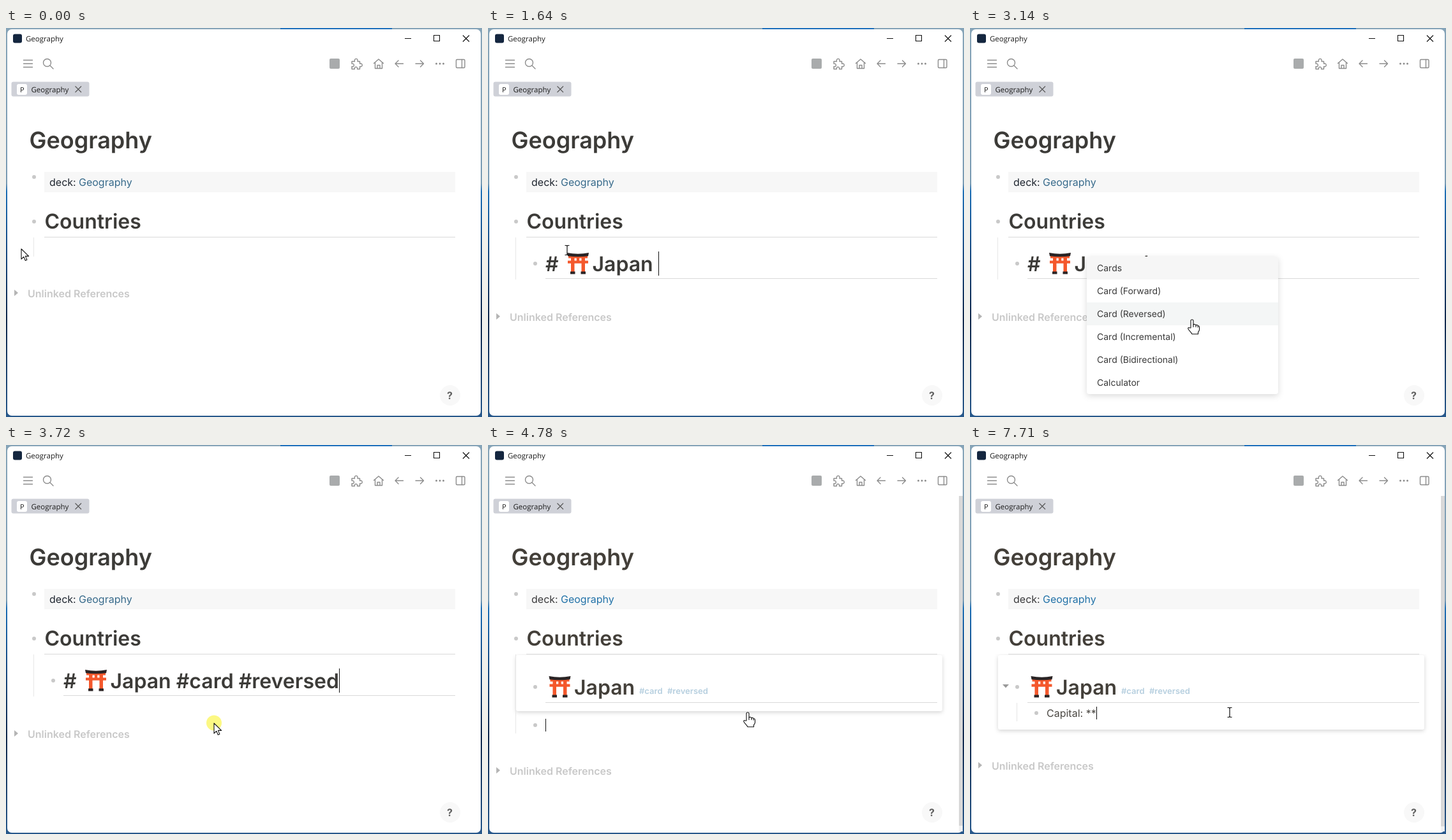
Recreate the animation shown at these times as an HTML page. Size 746 px wide and 611 px high, loop 8 s.

```html
<!DOCTYPE html>
<html lang="en">
<head>
<meta charset="utf-8">
<title>Geography</title>
<style>
  html, body { margin: 0; width: 100%; height: 100%; overflow: hidden; background: #fff; }
  svg { display: block; width: 746px; height: 611px; }
  text { white-space: pre; font-family: Inter, sans-serif; font-optical-sizing: none; text-rendering: geometricPrecision; }
  .ui { font: 11.5px "Open Sans", sans-serif; fill: #1c1c1c; }
  .title { font-size: 36px; font-weight: 600; }
  .head { font-size: 32px; font-weight: 600; }
  .body { font-size: 16px; }
  .tag { font-size: 13px; font-weight: 600; fill: #b6cfdf; }
  .item { font-size: 14px; fill: #3a3a3a; }
  .refs { font-size: 16px; font-weight: 600; fill: #c8c8c8; }
  .icon { fill: none; stroke: #8c8c8c; stroke-width: 1.4; stroke-linecap: round; stroke-linejoin: round; }
  .win { fill: none; stroke: #111; stroke-width: 1.1; }
  .cursor { fill: #fff; stroke: #111; stroke-width: 1.1; stroke-linejoin: round; }
  .card { filter: drop-shadow(0 2px 3px rgba(0, 0, 0, .17)); }
  .menu { filter: drop-shadow(0 3px 5px rgba(0, 0, 0, .14)); }
</style>
</head>
<body>
<svg viewBox="0 0 746 611" xmlns="http://www.w3.org/2000/svg">
  <defs>
    <linearGradient id="desk" x2="0" y2="1">
      <stop offset="0" stop-color="#86a4b8"/>
      <stop offset=".4" stop-color="#7b9cb4"/>
      <stop offset=".42" stop-color="#1f70b6"/>
      <stop offset=".56" stop-color="#1b4f88"/>
      <stop offset=".75" stop-color="#12294c"/>
      <stop offset="1" stop-color="#28598c"/>
    </linearGradient>
    <clipPath id="menuClip"><rect x="183" y="359" width="300" height="221" rx="4"/></clipPath>
  </defs>
  <rect width="746" height="611" fill="url(#desk)"/>
  <rect x="430" width="175" height="2" fill="#2272bd"/>
  <rect x="2" y="2" width="742" height="607" rx="7" fill="#fff"/>

  <rect x="11" y="9.500" width="14" height="14" rx="3" fill="#14263f"/>
  <text class="ui" x="31" y="21">Geography</text>
  <path class="win" d="M625 16.500h10M670.500 11.500h9v9h-9zM716 11.500l10 10m0-10l-10 10"/>

  <g class="icon">
    <path d="M27.500 50.500h14m-14 5.500h14m-14 5.500h14"/>
    <circle cx="64.500" cy="54.500" r="6"/>
    <path d="M69 59l5 5"/>
    <path d="M543 52.500h3.500c-1.500-5.500 6-5.500 4.500 0h3.500v3.500c5-1.500 5 6 0 4.500v4h-4c1-4.500-5-4.500-4 0H542v-4c4.500 1.500 4.500-5.500 0-4.500v-3.500z"/>
    <path d="M576.500 55.500l7.500-6.500 7.500 6.500M578.500 54v9.500h11V54M582 63.500v-5h4v5"/>
    <path d="M622.500 56h-12.500l5-5m-5 5l5 5M642 56h12.500l-5-5m5 5l-5 5"/>
    <rect x="705.500" y="49.500" width="13.500" height="13" rx="1.500"/>
    <path d="M714.500 49.500v13"/>
  </g>
  <g fill="#8c8c8c"><circle cx="674.500" cy="56" r="1.500"/><circle cx="680" cy="56" r="1.500"/><circle cx="685.500" cy="56" r="1.500"/></g>
  <rect x="507" y="48" width="16" height="16" rx="2" fill="#a9abac"/>

  <rect x="8.500" y="84.500" width="122" height="23" rx="3" fill="#cfd1d8"/>
  <rect x="17" y="88" width="16" height="17" rx="3" fill="#fff"/>
  <text class="ui" x="22" y="101" style="font-size:11px">P</text>
  <text class="ui" x="39.500" y="101">Geography</text>
  <path class="win" d="M108.500 91.500l9.500 9.500m0-9.500l-9.500 9.500" style="stroke:#555"/>

  <rect x="60" y="226" width="644" height="32" fill="#f7f7f7"/>
  <g id="page"></g>
  <circle cx="696" cy="577" r="16" fill="#f8f8f8"/>
  <text x="691" y="583" style="font-size:16px;font-weight:700" fill="#606060">?</text>
  <g id="mouse"></g>
  <text id="ruler" visibility="hidden"></text>
</svg>
<script>
const LOOP = 8000;
const page = document.getElementById('page');
const mouse = document.getElementById('mouse');
const ruler = document.getElementById('ruler');

const CLICK = 400, PASTE = 640, SLASH = 2050, PICK = 3660, ENTER = 4780, TAB = 5060;
const MENUS = {
  all: ['Page reference', 'Page embed', 'Block reference', 'Block embed', 'Link', 'Image link'],
  c: ['C', 'Cards', 'Cloze', 'CANCELED', 'Scheduled', 'Block embed'],
  car: ['Cards', 'Card (Forward)', 'Card (Reversed)', 'Card (Incremental)', 'Card (Bidirectional)', 'Calculator']
};
// time, x, y of the pointer's hot spot
const TRACK = [
  [50, 24, 347], [CLICK, 124, 349], [2550, 124, 349], [2950, 352, 470], [3139, 352, 470],
  [3140, 348, 458], [3190, 348, 458], [3460, 326, 437], [3760, 326, 437], [4090, 407, 420]
];
const SHAPES = {
  arrow: '<path class="cursor" d="M0 0v16l3.800-3.600 2.500 5.800 2.600-1.100-2.500-5.700h5.200z"/>',
  beam: '<path d="M-3.500-7.500h2.500l1 1 1-1h2.500M0-6.500v13M-3.500 7.500h2.500l1-1 1 1h2.500" fill="none" stroke="#111" stroke-width="1.200"/>',
  hand: '<path class="cursor" d="M-2 13V2a2 2 0 0 1 4 0v6c1-1 3.500-.7 4 .8c1.200-.8 2.800-.3 3.200 1c1.300-.4 2.300.4 2.300 2v4c0 2-1.500 3-2 4v3H0c-1-2.500-4.500-5-6-8c-1-2 .8-3 2.200-1.800z"/>' +
    '<path class="cursor" d="M2 8v4M6 9v3M9.200 10v2.500"/>'
};

const within = (t, a, b) => t >= a && t < b;
const label = (cls, x, y, s, fill) => `<text class="${cls}" x="${x}" y="${y}"${fill ? ` fill="${fill}"` : ''}>${s}</text>`;
const box = (x, y, w, h, fill, more = '') => `<rect x="${x}" y="${y}" width="${w}" height="${h}" fill="${fill}" ${more}/>`;
const bullet = (x, y) => `<circle cx="${x}" cy="${y}" r="3" fill="#c9c9c9"/>`;
const rule = (x, y) => box(x, y, 704 - x, 1, '#d9d9d9');
const guide = (x, y, h) => box(x, y, 1, h, '#e6e6e6');
const caret = (x, y, h) => box(Math.round(x), y, 1, h, '#111');

// number of keys pressed by t when n keys are spread evenly over [a, b]
const keys = (t, a, b, n) => t < a ? 0 : Math.min(n, 1 + Math.floor((t - a) / (b - a) * (n - 1) + 1e-6));

function textWidth(cls, s) {
  ruler.setAttribute('class', cls);
  ruler.textContent = s;
  return s ? ruler.getComputedTextLength() : 0;
}

function pointer(t) {
  const i = TRACK.findIndex(k => k[0] > t);
  if (i === 0) return TRACK[0].slice(1);
  if (i < 0) return TRACK[TRACK.length - 1].slice(1);
  const [a, ax, ay] = TRACK[i - 1], [b, bx, by] = TRACK[i];
  const p = (t - a) / (b - a), e = p * p * (3 - 2 * p);
  return [ax + (bx - ax) * e, ay + (by - ay) * e];
}

function torii(x, y) {
  return `<g transform="translate(${x} ${y})">
    <path d="M6 6h5.500v25H6zM22.500 6H28v25h-5.500zM14.800 8h4.400v6h-4.400z" fill="#f4582c"/>
    <path d="M2 4q15 3 30 0v4.500H2z" fill="#f4582c"/>
    <path d="M1 12.500h32v4.200H1z" fill="#f4582c"/>
    <path d="M0 0q17 3.500 34 0l-1 5.200q-16 2-32 0z" fill="#2a2425"/>
    <path d="M5 29.500h7.500V33.500H5zM21.500 29.500H29V33.500h-7.500z" fill="#2a2425"/></g>`;
}

function typedHeading(t) {
  if (t >= PICK) return 'Japan #card #reversed';
  const word = 'Japan '.slice(0, keys(t, 1020, 1640, 6));
  const query = [2050, 2180, 2340, 2520].filter(k => t >= k).length;
  return word + '/car'.slice(0, query);
}

function editing(t, ink) {
  if (t < CLICK + 50) return guide(43, 329, 30);
  if (t < PASTE) return guide(43, 329, 30) + bullet(74, 345) + caret(90, 335, 20);
  const s = typedHeading(t);
  const on = within(t, PASTE, 740) || within(t, 1020, 2900) || within(t, PICK, 4460);
  return guide(43, 329, 66) + bullet(74, 370) + rule(90, 393) +
    label('head', 90, 381.5, '#', ink) + torii(124, 353) + label('head', 163.5, 381.5, s, ink) +
    (on ? caret(163.5 + textWidth('head', s), 351, 38) : '');
}

function flashcard(t, ink) {
  const nested = t >= TAB;
  let out = nested ? '' : guide(43, 329, 124);
  out += `<g class="card">${box(44, 330, 668, nested ? 117 : 88, '#fff', 'rx="3"')}</g>` + box(40, 322, 676, 6, '#fff') +
    bullet(74, 380) + rule(90, 404) + torii(95.5, 363) + label('head', 135, 391.5, 'Japan', ink) +
    label('tag', 237, 391, '#card') + label('tag', 281, 391, '#reversed');
  if (!nested) return out + guide(43, 329, 124) + bullet(74, 440) + caret(90, 430, 20);
  const s = t < 7480 ? 'Capital'.slice(0, keys(t, 5600, 6460, 7)) : ['Capital:', 'Capital: ', 'Capital: **'][keys(t, 7480, 7710, 3) - 1];
  return out + '<path d="M51 376h10l-5 5.500z" fill="#999"/>' + guide(73, 405, 29) + bullet(104, 421) +
    label('body', 120, 427, s, '#4a4742') +
    (within(t, 6870, 7200) ? '' : caret(120 + textWidth('body', s), 411, 20));
}

function menu(t, [mx, my]) {
  const items = t < 2180 ? MENUS.all : t < 2430 ? MENUS.c : MENUS.car;
  const scrolls = items !== MENUS.car;
  let out = box(183, 359, 300, scrolls ? 221 : 216, '#fff', 'rx="4"');
  const hover = mx > 183 && t > 2600 ? Math.floor((my - 359) / 36) : -1;
  items.forEach((s, i) => {
    const y = 359 + i * 36;
    if (i === 0 || i === hover) out += box(183, y, 300, 36, i ? '#f4f6f6' : '#f6f6f6');
    out += label('item', 199, y + 23, s);
  });
  if (scrolls) out += box(477, 359, 6, 221, '#f2f2f2') + box(477, 359, 6, 76, '#d5d5d5');
  return `<g class="menu"><g clip-path="url(#menuClip)">${out}</g></g>`;
}

function drawPage(t, at) {
  const late = t >= ENTER;
  const ink = late ? '#433f39' : '#3c3b38';
  const refsY = t < PASTE ? 417 : t < ENTER ? 454 : t < TAB ? 512 : 504;
  let out = label('title', 36.5, 189, 'Geography', ink) + bullet(44, 234) +
    label('body', 68, 248, 'deck:', late ? '#3a3a3c' : '#1f2630') +
    label('body', 114, 248, 'Geography', late ? '#2272a8' : '#376a8b') +
    bullet(44, 304);
  out += late ? flashcard(t, ink) : editing(t, ink);
  out += label('head', 60.5, 315, 'Countries', ink) + rule(60, 328) +
    `<path d="M13 ${refsY - 6}l6 5-6 5z" fill="#b5b5b5"/>` + label('refs', 34, refsY + 6, 'Unlinked References');
  if (late) out += box(738, 80, 6, 527, '#f1f1f1') + box(738, 80, 6, t < TAB ? 518 : 519, '#d9d9d9');
  if (within(t, SLASH, PICK)) out += menu(t, at);
  return out;
}

function drawMouse(t, [x, y]) {
  const kind = t < 2600 ? (x < 60 ? 'arrow' : 'beam') : t < PICK ? (x > 183 ? 'hand' : 'beam') :
    t < ENTER ? 'arrow' : t < 5460 ? 'hand' : 'beam';
  const clicked = within(t, CLICK, 600) || within(t, 3540, 3780);
  return `<g transform="translate(${x.toFixed(1)} ${y.toFixed(1)})">` +
    (clicked ? '<circle cy="-.5" r="12" fill="#fcf883"/>' : '') + SHAPES[kind] + '</g>';
}

let last = '';
function draw(t) {
  const at = pointer(t);
  const html = drawPage(t, at);
  if (html !== last) page.innerHTML = last = html;
  mouse.innerHTML = drawMouse(t, at);
}

let start;
function tick(now) {
  start ??= now;
  draw((now - start) % LOOP);
  requestAnimationFrame(tick);
}
draw(0);
requestAnimationFrame(tick);
</script>
</body>
</html>
```
